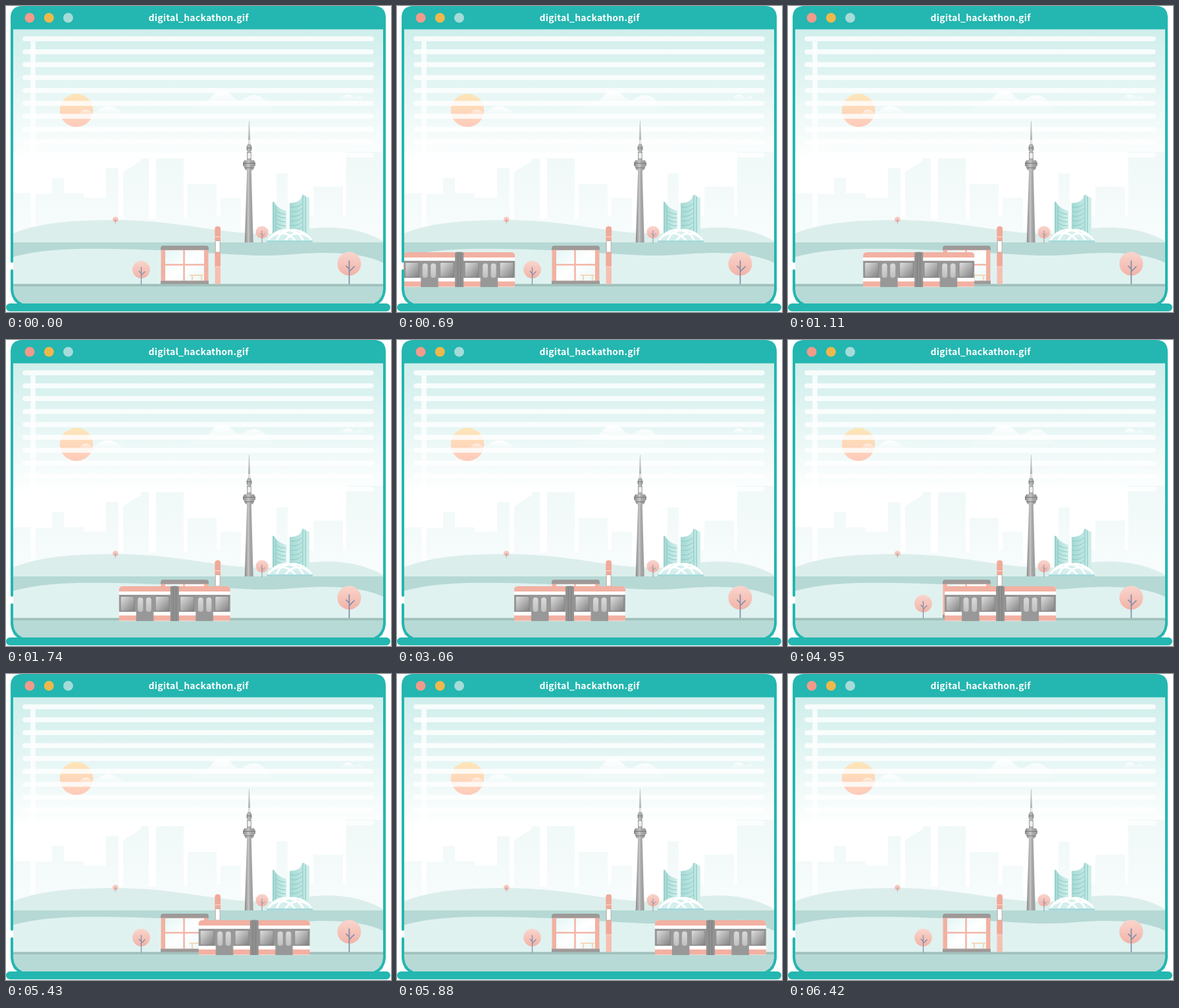
Animation of 585 by 466 pixels, one loop 6870 ms. Source, as an HTML page:

```html
<!DOCTYPE html>
<html lang="en">
<head>
<meta charset="utf-8">
<title>City tram</title>
<style>
  html, body { margin: 0; width: 100%; height: 100%; overflow: hidden; background: #fff; }
  svg { display: block; width: 585px; height: 466px; }
  text { font: 700 14px "Noto Sans CJK JP", "Noto Sans CJK SC", "Noto Sans CJK", "Open Sans", sans-serif; letter-spacing: .2px; }
  #tram { animation: ride 6870ms infinite; }

  /* Arrive while slowing down, wait at the stop, then speed up and leave. */
  @keyframes ride {
    0% { transform: translateX(-200px); animation-timing-function: step-end; }
    3.493% { transform: translateX(-160px); animation-timing-function: cubic-bezier(.333, .423, .667, .76); }
    13.1% { transform: translateX(69px); animation-timing-function: cubic-bezier(.333, .389, .667, .728); }
    16.157% { transform: translateX(114px); animation-timing-function: cubic-bezier(.333, .549, .667, .837); }
    23.144% { transform: translateX(165px); animation-timing-function: cubic-bezier(.333, .64, .667, 1); }
    30.131% { transform: translateX(178px); animation-timing-function: linear; }
    44.541% { transform: translateX(178px); animation-timing-function: cubic-bezier(.333, .073, .667, .413); }
    54.148% { transform: translateX(184px); animation-timing-function: cubic-bezier(.333, .184, .667, .483); }
    64.192% { transform: translateX(204px); animation-timing-function: cubic-bezier(.333, .238, .667, .561); }
    72.052% { transform: translateX(238px); animation-timing-function: cubic-bezier(.333, .244, .667, .545); }
    79.039% { transform: translateX(292.5px); animation-timing-function: cubic-bezier(.333, .25, .667, .581); }
    84.279% { transform: translateX(367px); animation-timing-function: cubic-bezier(.333, .259, .667, .592); }
    93.231%, 100% { transform: translateX(574px); }
  }
</style>
</head>
<body>
<svg viewBox="0 0 585 466" xmlns="http://www.w3.org/2000/svg">
  <defs>
    <linearGradient id="sky" x2="0" y2="1"><stop stop-color="#cfeeeb"/><stop offset=".62" stop-color="#fff"/></linearGradient>
    <linearGradient id="sun" x2="0" y2="1"><stop stop-color="#fee6b9"/><stop offset="1" stop-color="#fecabb"/></linearGradient>
    <linearGradient id="cloud" x2="0" y2="1"><stop stop-color="#fff"/><stop offset="1" stop-color="#fff" stop-opacity="0"/></linearGradient>
    <linearGradient id="city" x2="0" y2="1"><stop stop-color="#f0f8f8"/><stop offset="1" stop-color="#f8fcfc"/></linearGradient>
    <linearGradient id="leaf" x2="0" y2="1"><stop stop-color="#f9d5cd"/><stop offset="1" stop-color="#f2b3a7"/></linearGradient>
    <linearGradient id="steel"><stop stop-color="#888"/><stop offset=".45" stop-color="#c6c6c6"/><stop offset=".6" stop-color="#a9a9a9"/><stop offset="1" stop-color="#999"/></linearGradient>
    <linearGradient id="tower"><stop stop-color="#a5d9d4"/><stop offset="1" stop-color="#d0efeb"/></linearGradient>
    <linearGradient id="glass" x2="1" y2="1"><stop stop-color="#dedede"/><stop offset="1" stop-color="#848484"/></linearGradient>
    <linearGradient id="pill" x2="0" y2="1"><stop stop-color="#dadada"/><stop offset="1" stop-color="#c0c0c0"/></linearGradient>
    <linearGradient id="pane" x2="1" y2="1"><stop stop-color="#e4f6f6"/><stop offset=".5" stop-color="#fff"/><stop offset="1" stop-color="#eaf8f7"/></linearGradient>
    <clipPath id="inside"><path d="M7 30H577V432Q577 454 559 454H25Q7 454 7 432Z"/></clipPath>

    <g id="tree">
      <circle r="18" fill="url(#leaf)"/>
      <path d="M0-5V31M0 12 8 4M0 8-5 3" fill="none" stroke="#7e8ca9" stroke-width="1.7"/>
    </g>

    <g id="car">
      <path d="M0 388V380Q0 375 6 375H84.5V428H0Z" fill="#fff"/>
      <path d="M0 383V380Q0 375 6 375H84.5V383ZM0 419.5H84.5V427.5H0Z" fill="#f2b0a2"/>
      <path d="M0 388H84.5V414H0ZM26 388H52.5V428H26Z" fill="#989898"/>
      <path d="M2 390.5H23.5V413H2ZM55 390.5H76.5V413H55Z" fill="#7f7f7f"/>
      <rect x="28.5" y="392" width="8" height="22" rx="4" fill="url(#pill)"/>
      <rect x="41" y="392" width="8" height="22" rx="4" fill="url(#pill)"/>
    </g>
    <rect id="window" y="391" width="20" height="21.5" rx="1" fill="url(#glass)"/>
  </defs>

  <g clip-path="url(#inside)">
    <path d="M11 35H573V454H11Z" fill="#fff"/>
    <path d="M11 35H573V360H11Z" fill="url(#sky)"/>

    <path fill="url(#city)" d="M11 360V285H38V300H44V286H70V262H88V285H118V292H152V247H171V324H178V253L205 236V232H217V324H228V232H270V324H276V271H320V320H326V292H357V340H411V255H428V320H467V275H512V320H517V222H573V360Z"/>

    <circle cx="107" cy="159" r="25.3" fill="url(#sun)"/>
    <g fill="url(#cloud)">
      <path d="M102 167Q111 166 115 160Q122 154 130 162Q136 164 142 157Q154 149 165 155Q172 158 183 166Z"/>
      <path d="M270 162Q288 152 300 146Q309 145 315 135Q328 123 342 135Q350 146 359 143Q379 128 394 144Q403 149 406 162Z"/>
      <path d="M507 143Q511 140 514 136Q521 132 527 138Q530 141 533 138Q539 135 544 143Z"/>
    </g>

    <g fill="none" stroke="#fff" stroke-width="7.6" stroke-opacity=".82">
      <path d="M41 54V338"/>
      <path stroke-linecap="round" d="M29 50H555M29 69.7H555M29 89.3H555M29 109H555M29 128.7H555M29 148.3H555M29 168H555M29 187.7H555M29 207.3H555M29 227H555"/>
    </g>

    <path d="M11 346C55 329 105 326 165 326C240 326 290 338 345 344Q400 350 436 343C480 333 535 335 573 358V362H11Z" fill="#dceeeb"/>
    <path d="M11 360H573V424H11Z" fill="#b6d9d5"/>
    <path d="M11 382C55 370 105 369 165 370C245 371 310 377 380 380C425 381 448 375 490 376C530 377 554 382 573 391V424H11Z" fill="#e0f2f0"/>

    <use href="#tree" transform="translate(166.3 325) scale(.24)"/>

    <g fill="url(#steel)">
      <path d="M366.3 249H372.7L375.7 360H362.7Z"/>
      <path d="M366.2 222H372.8V235H366.2Z"/>
      <path d="M362 235H377L379 239V243L376 246V249L372 251H367L363 249V246L360 243V239Z"/>
      <path d="M367 211H372L373.6 215V219L371 223H368L365.5 219V215Z"/>
      <path d="M369.1 175H369.8L370.5 193L371.3 212H367.8L368.5 193Z"/>
    </g>
    <path d="M360 239.5H379M362 246.5H377M366 216H373" stroke="#777" stroke-width="1"/>
    <path d="M367.2 224H371.8V232H367.2ZM368.4 204H370.8V210H368.4Z" fill="#eee"/>

    <path d="M405 298Q408 298 409 301Q414 309 426 312V355H405Z" fill="url(#tower)"/>
    <path d="M431 300Q446 301 450 289Q451 286 454 288Q456 291 461 292V357H431Z" fill="url(#tower)"/>
    <path d="M406 299V354M410 304V354M451 288V355M455 290V355" stroke="#92cec9" stroke-width="1.4"/>
    <path d="M411 313Q417 317 425 317M411 319Q417 323 425 323M411 325Q417 329 425 329M411 331Q417 335 425 335M411 337Q417 341 425 341M432 306Q443 308 450 301M432 313Q443 315 450 308M432 320Q443 322 450 315M432 327Q443 329 450 322M432 334Q443 336 450 329M432 341Q443 343 450 336" fill="none" stroke="#88cbc5" stroke-width="1"/>
    <use href="#tree" transform="translate(389 344.5) scale(.53)"/>
    <path d="M398 358Q408 341 431 341Q454 341 465 358Z" fill="#d4efed"/>
    <path d="M398 358Q407 341 427 341Q446 343 452 358M411 358Q416 341 438 341Q456 343 465 358M402 352Q423 337 440 358M424 358Q438 338 460 352" fill="none" stroke="#fff" stroke-width="2.8"/>
    <path d="M396 357H466V360H396Z" fill="#a8d9da"/>

    <path d="M11 426H573V454H11Z" fill="#b7dad6"/>
    <path d="M11 423.3H573V427H11Z" fill="#a1c1bc"/>

    <use href="#tree" transform="translate(205.5 401.3) scale(.74)"/>
    <use href="#tree" transform="translate(521.5 392.5)"/>

    <path d="M235.5 370H307.5V419H235.5Z" fill="#f2b1a2"/>
    <path d="M242 372H301V418.5H242Z" fill="url(#pane)"/>
    <path d="M242 394H301M270.5 372V418.5" stroke="#f3b5a7" stroke-width="2.6"/>
    <path d="M279 410H300M283 410V418M297 410V418" fill="none" stroke="#f4d9b8" stroke-width="2.2"/>
    <path d="M235 371.5V369Q235 365 239 365H304Q308 365 308 369V371.5ZM235 418.5H308V423.5H235Z" fill="#9d9a99"/>

    <path d="M317.5 423.5V339Q317.5 335.5 321.7 335.5Q326 335.5 326 339V423.5Z" fill="#f5bfb2"/>
    <path d="M317.5 357V339Q317.5 335.5 321.7 335.5Q326 335.5 326 339V357ZM317.5 375H326V397H317.5Z" fill="#f1a999"/>
    <path d="M317.5 351.5H326M317.5 397H326" stroke="#f9dcd5" stroke-width="1.2"/>
    <rect x="318.2" y="357.5" width="7" height="17.5" rx="1" fill="#fff" stroke="#b3aaa8"/>

    <g id="tram">
      <use href="#car"/>
      <use href="#car" transform="matrix(-1 0 0 1 169 0)"/>
      <use href="#window" x="2.7"/><use href="#window" x="55.7"/>
      <use href="#window" x="93.3"/><use href="#window" x="146.3"/>
      <path d="M78 376Q80 373.5 82.3 375Q84.5 373.5 86.7 375Q89 373.5 91 376V428H78Z" fill="#929292"/>
      <path d="M82.3 375V428M86.7 375V428" stroke="#7e7e7e" stroke-width="1"/>
    </g>
  </g>

  <g fill="none" stroke="#24b6b0" stroke-width="4" stroke-linecap="round">
    <path d="M9 30V389M9 403V432Q10 448 23 454"/>
    <path d="M575 30V432Q574 448 561 454"/>
  </g>
  <path d="M7 35.5V18Q7 0 25 0H559Q577 0 577 18V35.5Z" fill="#24b6b0"/>
  <rect y="453" width="584" height="12" rx="6" fill="#24b6b0"/>
  <circle cx="36" cy="18" r="7.5" fill="#f29b8c"/>
  <circle cx="65.3" cy="18" r="7.5" fill="#edb94d"/>
  <circle cx="94.5" cy="18" r="7.5" fill="#a5dcd9"/>
  <text x="292.6" y="23" text-anchor="middle" fill="#fff">digital_hackathon.gif</text>
</svg>
</body>
</html>
```
